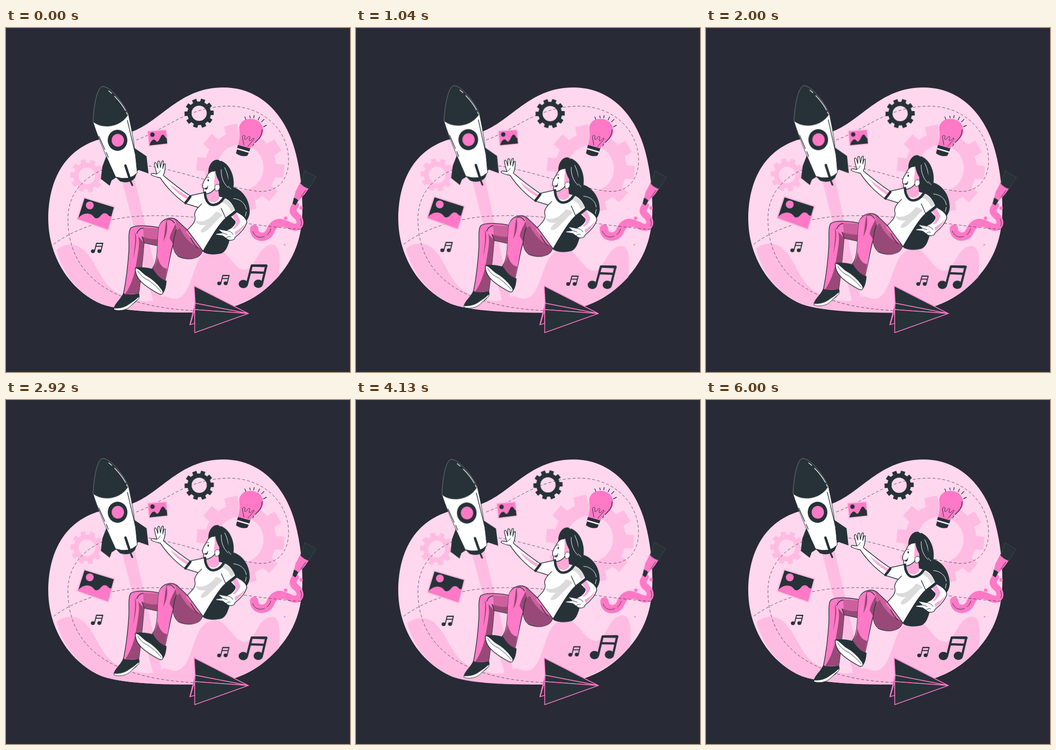
An HTML page that plays this animation: 700x700 px, repeating every 6040 ms.

```html
<!DOCTYPE html>
<html lang="en">
<head>
<meta charset="utf-8">
<title>Creative flight</title>
<style>
html, body { margin: 0; width: 100%; height: 100%; overflow: hidden; background: #282a36; }
svg { display: block; width: 100vw; height: 100vh; }
.d { fill: #263238; }
.p { fill: #ff79c6; }
.s { fill: #ffbce2; }
.b { fill: #ffa8da; }
.w { fill: #fff; }
.m { fill: #cc619e; }
.k { fill: #994977; }
.g { fill: #dbdbdb; }
.o { stroke: #263238; stroke-width: 1.4; stroke-linejoin: round; stroke-linecap: round; }
.line, .shine, .dash, .bar, .paint { fill: none; stroke: #263238; stroke-linecap: round; stroke-linejoin: round; }
.line { stroke-width: 1.4; }
.shine { stroke: #fff; stroke-width: 1.4; }
.paint { stroke: #ff79c6; }
.thin { stroke-width: 1; }
.dash { stroke-width: 1; stroke-dasharray: 6 4; stroke-linecap: butt; opacity: .75; }
</style>
</head>
<body>
<svg viewBox="0 0 700 700">
  <defs>
    <g id="note">
      <ellipse class="d" cx="483" cy="521" rx="9.5" ry="8.5"/>
      <ellipse class="d" cx="513.5" cy="520.5" rx="9.5" ry="8.5"/>
      <path class="bar" stroke-width="4.5" d="M490.5 521L500 483.5L529.5 484.500L521 520M497 497L526 498"/>
      <path class="d" d="M499 481H530Q533 482 532 486H499Z"/>
    </g>
  </defs>

  <path fill="#ffd7ee" d="M86 388C86 330 105 255 185 228C215 221 240 219 266 207C320 182 358 121 442 121C510 121 555 165 578 220C595 260 604 320 603 375C602 425 588 470 550 510C512 552 460 579 380 579C330 579 240 578 195 562C130 535 86 465 86 388Z"/>

  <g class="sway">
    <path class="s" d="M103 452C118 438 140 438 155 449C185 472 190 520 228 540C255 552 290 565 316 548C325 542 330 551 345 551C372 549 378 500 392 472C402 452 425 440 442 455C462 472 468 493 488 492C508 490 512 441 542 441C556 442 558 465 557 480L556 504C512 552 455 579 380 579C330 579 240 578 195 562C150 543 115 500 103 452Z"/>
    <path class="s" d="M237 314L262 308L316 545Q317 560 300 558Z"/>
    <path class="s gear" data-at="477 284 90 73 47 5"/>
    <path class="s gear" data-at="164.5 301 34 27 17 4"/>
  </g>

  <g class="tube">
    <path class="paint" stroke-width="17" d="M505 409C505 428 529 430 537 415C543 400 550 396 560 397"/>
    <path class="paint" stroke-width="14" d="M556 396C574 396 580 408 592 405C602 400 599 388 590 381C581 374 584 367 589 361"/>
    <path class="line thin" d="M502 414C506 426 517 428 526 424M531 421Q537 417 539 409M599 388Q603 396 600 403"/>
    <circle class="p" cx="569" cy="387" r="3.5"/>
    <circle class="p" cx="600.5" cy="366" r="3.5"/>
    <circle class="p" cx="567" cy="441" r="1.5"/>
    <path class="p" d="M600 312L617 325L608 338L595 352L586 346L589 333Z"/>
    <path class="d" stroke="#566067" stroke-width=".5" d="M608 290L631 303L616 327Q606 324 599 316Z"/>
    <path class="d" d="M586 345Q591 347 595 351L589 361L583 357Z"/>
    <path class="line thin" d="M610 330L600 344"/>
  </g>

  <path class="dash" d="M265 228C300 215 335 192 362 180C395 165 425 159 455 159C520 159 575 205 575 270C575 308 553 337 510 332C450 324 380 300 328 288C285 278 238 271 200 287C150 307 126 345 126 388C126 500 210 567 383 575"/>
  <path class="dash" d="M97 440C140 408 205 387 270 383C390 376 485 402 603 410"/>

  <g class="sway">
    <path class="d gear" data-at="393 173.5 30 24 15.5 -2"/>

    <path class="p" stroke="#ffbce2" stroke-width="1.8" d="M288 210L326 207L329 236L291 240Z"/>
    <circle class="d" cx="298" cy="217" r="4.5"/>
    <path class="d" d="M292 239C294 231 298 227 301 227C305 227 305 233 309 231C314 227 315 217 319 217C324 218 323 224 327 224L328 235Z"/>

    <path class="d" stroke="#ffbce2" stroke-width="2.500" d="M159 345L221 364L208 411L145 389Z"/>
    <circle class="p" cx="170.500" cy="361" r="8"/>
    <path class="p" d="M146 388C153 379 164 375 172 379C180 382 179 389 186 387C193 385 194 376 202 377C209 378 208 385 215 383L207.500 410Z"/>

    <use href="#note"/>
    <use href="#note" transform="translate(-30.8 230.2) scale(.43)"/>
    <use href="#note" transform="translate(226.2 295.7) scale(.43)"/>

    <path class="d" d="M204 261L196 282L193 307L211 321L215 310L226 303ZM261 244L286 261L290 296L270 289L264 293Z"/>
    <path class="d" d="M223 303L232 312Q250 318 262 306L267 294Z"/>
    <path class="w o thin" d="M177 190Q185 220 223 303Q250 312 267 295Q262 232 249 175Z"/>
    <path class="d" stroke="#a9adb2" stroke-width=".6" d="M197 119C187 119 179 150 177 191C195 206 232 204 249 176C238 150 212 119 197 119Z"/>
    <path class="shine" d="M221 139Q235 153 243 168M209 128L215 133M245 172L247 176"/>
    <ellipse class="d" cx="227" cy="228.5" rx="20" ry="21.5"/>
    <ellipse class="p" cx="227.5" cy="228.5" rx="12.5" ry="13"/>
    <path class="line" d="M189 220L201 247M204 253L208 263M247 188L263 256M264 262L266 273"/>
    <path class="bar" stroke-width="5" d="M243 280L252 307"/>
    <path class="bar" stroke-width="3.5" d="M251 306L257 320"/>
  </g>

  <g id="bulb">
    <path class="p" d="M472 240C475 228 477 219 475 208C473 192 485 184 500 185C516 186 526 200 523 213C518 231 502 230 497 247Z"/>
    <path class="line thin" d="M484 238L481 222C482 216 488 218 486 223C484 228 488 228 491 224C495 217 498 222 495 226C493 231 498 230 501 226C505 221 506 227 502 229L492 241"/>
    <path class="line" d="M521 207C521 221 513 227 507 233M504 236L502 240M486 181L488 186M496 179L497 183M505 178L504 183M516 181L513 187M525 186L520 191M530 198L524 201"/>
    <path class="d" d="M472 238L497 245L495 252L470 245Z"/>
    <path class="shine" d="M471 245L495 252"/>
    <path class="d" d="M470 247L494 254L491 260Q479 263 468 255Z"/>
  </g>

  <g class="float">
    <path class="d" d="M437 270C456 277 466 302 463 324C480 329 496 348 496 374C495 392 482 402 466 410C452 425 456 448 440 458C425 463 405 461 400 454L402 400L432 340L425 300Z"/>
    <path class="shine thin" d="M438 286C439 304 446 316 458 328M463 347C477 348 487 357 489 369M489 374L487 383M445 284Q452 298 452 308"/>

    <g id="farLeg">
      <path class="d o" d="M239 540C235 552 222 560 220 570C224 576 242 575 251 567C259 560 268 556 271 546L270 539Z"/>
      <path class="w o thin" d="M220 570C234 571 244 567 253 560Q263 554 271 546L270 551C262 557 256 564 250 569C240 576 225 576 220 573Z"/>
      <path class="p o" d="M316 407C293 402 262 400 254 407C248 415 251 435 250 453C248 485 244 516 239 541Q254 545 270 541C275 509 278 470 281 437L318 445Z"/>
      <path class="m" d="M279 406L314 408L317 444L281 436Z"/>
      <path class="k" d="M281 436L276 424Q294 432 317 429V444ZM281 437C278 470 275 509 270 541L242 542C255 524 262 500 265 480C269 455 273 438 269 424Z"/>
      <path class="k" d="M262 416C268 424 264 448 259 470C262 445 264 432 262 416Z"/>
      <path class="line" d="M266 418Q270 408 279 407M281 437L277 425"/>
    </g>

    <g id="nearLeg">
      <path class="m o" d="M312 402C319 386 340 382 350 393L369 411L400 452C397 468 374 475 351 465Q342 458 340 442C334 460 331 486 323 516Q308 510 298 489C312 473 306 430 312 402Z"/>
      <path class="k" d="M341 438C342 414 348 412 354 407C361 425 382 447 396 447L399 456C393 470 371 474 352 464Q343 457 341 438Z"/>
      <path class="p" d="M312 402C320 388 336 385 344 392C350 402 343 420 339 440C333 458 331 488 323 515Q308 510 299 489C312 473 306 430 312 402Z"/>
      <path class="k" d="M308 464C312 480 318 489 328 490L323 515Q308 510 299 489Q308 478 308 464Z"/>
      <path class="k" d="M327 390C323 402 324 415 320 434C329 418 329 405 327 390ZM345 398C341 408 336 414 333 428L340 440C345 417 348 409 345 398Z"/>
      <path class="p" d="M369 412L398 450L390 445C380 432 373 423 366 415Z"/>
      <path class="line" d="M327 391Q335 386 343 397M340 442Q342 421 347 410M376 427Q384 443 391 448"/>
      <path class="d o" d="M264 488C278 486 290 489 299 491C307 505 316 512 326 515C325 527 323 536 318 540Z"/>
      <path class="w o" d="M263 489C269 486 278 499 286 504C297 510 309 521 317 532C322 540 318 544 311 541C298 534 282 525 272 513Q263 502 263 489Z"/>
      <path class="line thin" d="M268 494Q275 507 291 514Q304 523 316 537"/>
    </g>

    <g id="reach">
      <path class="w o" d="M314 305C306 303 300 302 296 299C294 296 297 295 300 296L307 297C305 290 303 283 302 277C302 273 305 273 306 276L309 285L309 273C309 270 312 270 313 273L314 284L317 272C318 269 321 270 320 273L319 286L321 278C323 275 325 276 324 279C324 290 323 295 320 300C336 313 355 329 374 341L365 357C347 345 327 325 314 305Z"/>
      <path class="b" d="M333 317C346 328 358 335 371 344L368 348C355 341 341 330 333 317Z"/>
      <path class="line thin" d="M307 297Q312 295 314 290"/>
    </g>

    <path class="w o" d="M376 341L403 335L441 344C453 347 462 357 467 371L447 387C434 398 420 422 401 454L369 411C378 402 388 393 384 382Q383 374 391 365L365 357Z"/>
    <path class="g" d="M386 391C395 397 413 393 427 374C434 374 438 378 441 382C433 385 430 392 425 396C414 407 406 417 398 416C393 414 401 405 407 401C396 402 387 400 386 391ZM438 346C449 347 461 357 465 369L458 374C454 363 447 355 435 354Z"/>
    <path class="line" d="M391 365L398 358M447 387L438 367"/>
    <path class="bar" stroke-width="5" d="M375 343Q371 349 365 356"/>

    <g id="hipArm">
      <path class="w o" d="M455 382L469 374C483 381 490 388 490 396C486 409 475 419 466 426C465 433 453 434 448 428L441 423L428 421Q425 419 429 418L440 417L433 411Q433 408 437 410L448 412L458 407C464 402 468 397 466 393Z"/>
      <path class="b" d="M459 381L469 376L477 392Q474 402 465 409L461 408C467 402 470 397 467 392ZM467 422C477 414 484 406 488 396Q482 406 465 415Z"/>
      <path class="line thin" d="M441 417L450 420M447 412Q459 413 462 420M448 428Q451 423 457 425"/>
      <path class="bar" stroke-width="5" d="M468 373Q460 380 449 387"/>
    </g>

    <g id="head">
      <path class="b" d="M408 332L431 322L434 347C427 359 413 356 408 345Z"/>
      <path class="w o" d="M414 292L408 303C405 308 399 316 400 322Q400 326 403 327C400 334 403 340 410 337C416 336 422 331 425 327L434 321L433 290Z"/>
      <path class="b" d="M424 291L434 291V321L425 326C421 317 427 305 424 291Z"/>
      <path class="d" d="M412 297C410 281 420 267 431 268C438 270 440 278 441 286C456 298 455 327 446 337C438 332 436 322 436 316C431 309 427 299 426 291C421 291 416 293 412 297Z"/>
      <path class="w o thin" d="M425 325C424 317 434 316 435 322C436 329 430 333 426 331Z"/>
      <ellipse class="d" cx="411.5" cy="310" rx="1.4" ry="2.4"/>
      <path class="line thin" d="M408 305Q410 302 413 304M404 326Q409 327 411 321"/>
      <path class="d" d="M404 326Q409 327 411 322Q411 329 406 329Z"/>
      <path class="shine thin" d="M438 288C437 302 442 316 452 325"/>
      <path class="bar" stroke-width="5" stroke-linecap="butt" d="M405 335C405 349 412 361 423 360C432 359 439 352 443 346"/>
    </g>
  </g>

  <g class="d" stroke="#ff79c6" stroke-width="1.5" stroke-linejoin="round">
    <path d="M385 560L374 604L384 601V573Z"/>
    <path d="M384 573L375 603"/>
    <path d="M383 525L493 581L385 560Z"/>
    <path d="M385 560L493 581L384 573Z"/>
    <path d="M384 573L493 581L384 620Z"/>
  </g>
</svg>
<script>
const LOOP = 6040;
const CYCLE = 6000;

function gearPath(cx, cy, outer, body, hole, phase) {
  const teeth = 10;
  const at = (r, deg) => {
    const a = deg * Math.PI / 180;
    return `${cx + r * Math.cos(a)} ${cy + r * Math.sin(a)}`;
  };
  let d = '';
  for (let i = 0; i < teeth; i++) {
    const a = phase + i * 360 / teeth;
    d += `${i ? `A${body} ${body} 0 0 1 ` : 'M'}${at(body, a - 11)}` +
      `L${at(outer, a - 8.5)}L${at(outer, a + 8.5)}L${at(body, a + 11)}`;
  }
  d += `A${body} ${body} 0 0 1 ${at(body, phase - 11)}Z`;
  return d + `M${cx - hole} ${cy}a${hole} ${hole} 0 1 0 ${2 * hole} 0a${hole} ${hole} 0 1 0 ${-2 * hole} 0Z`;
}

document.querySelectorAll('.gear').forEach(el => {
  el.setAttribute('d', gearPath(...el.dataset.at.split(' ').map(Number)));
  el.setAttribute('fill-rule', 'evenodd');
});

// Each step is [time in ms, transform]; the pose rests after the last step.
function play(selector, steps, origin = '0 0') {
  const frames = steps.map(([ms, transform]) => ({ offset: ms / LOOP, transform }));
  frames.push({ offset: 1, transform: steps[steps.length - 1][1] });
  document.querySelectorAll(selector).forEach(el => {
    el.style.transformOrigin = origin;
    el.animate(frames, { duration: LOOP, iterations: Infinity });
  });
}

const swing = [
  [0, 'rotate(0deg)'],
  [CYCLE / 4, 'rotate(1deg)'],
  [CYCLE * 3 / 4, 'rotate(-1deg)'],
  [CYCLE, 'rotate(0deg)']
];
play('.sway', swing, '335px 350px');
play('.tube', swing, '565px 366px');
play('.float', [
  [0, 'translateY(0px)'],
  [CYCLE / 2, 'translateY(-14px)'],
  [CYCLE, 'translateY(0px)']
]);
</script>
</body>
</html>
```
